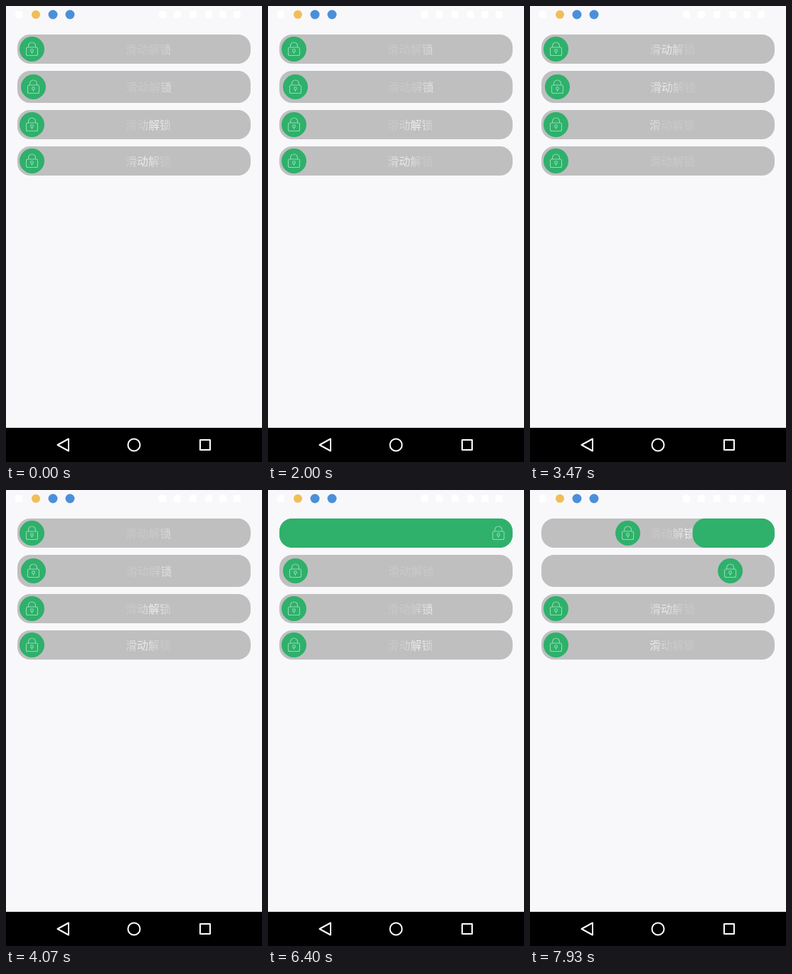
These frames come from a looping animation (360x640 px, 8 s). An HTML page:

```html
<!DOCTYPE html>
<html lang="zh">
<head>
<meta charset="utf-8">
<title>Slide to unlock</title>
<style>
  html, body { margin: 0; width: 100%; height: 100%; overflow: hidden; background: #f8f8fa; }
  svg { display: block; width: 360px; height: 640px; }
  text { font: 16px "Noto Sans CJK SC", "Noto Sans CJK", sans-serif; }
  .nav { fill: none; stroke: #fff; stroke-width: 2; stroke-linejoin: round; }
  .lock { fill: none; stroke: #8fdcb0; stroke-width: 1.1; }
</style>
</head>
<body>
<svg id="stage" viewBox="0 0 360 640">
  <rect width="360" height="640" fill="#f8f8fa"/>
  <g id="status">
    <circle cx="42" cy="12" r="6" fill="#f0be58"/>
    <circle cx="66" cy="12" r="6.5" fill="#4b8fda"/>
    <circle cx="90" cy="12" r="6.5" fill="#4b8fda"/>
  </g>
  <g id="rows"></g>
  <rect y="592" width="360" height="48"/>
  <g class="nav">
    <path d="M72.5 616 88 607.5V624.5Z"/>
    <circle cx="180" cy="616" r="8.5"/>
    <rect x="273" y="609" width="14" height="14"/>
  </g>
</svg>
<script>
const LOOP = 8000;
const LEFT = 16, RIGHT = 344, CORNER = 18, OPEN_X = 324;
const GREEN = '#2fb06b', TRACK = '#bfbfc0';
const TEXT_DIM = '#c9c9ca', TEXT_LIT = '#efeff0';
const SHEEN = { start: 130, period: 2060, speed: 0.08, reach: 27 };

// sheen: x of the bright spot at time zero
const ROWS = [
  { y: 40, h: 41, knobX: 36.5, textX: 168, sheen: 245 },
  { y: 91, h: 45, knobX: 38.5, textX: 169, sheen: 239 },
  { y: 146, h: 41, knobX: 36.5, textX: 168, sheen: 213 },
  { y: 197, h: 41, knobX: 36.5, textX: 168, sheen: 195 }
];

// drags as [time, knob x]
const DRAG_1 = [[4760, 36.5], [4850, 90], [4940, 200], [5035, 271]];
const DRAG_2 = [[7700, 38.5], [7800, 66], [7870, 172], [7930, 281.5], [8000, 290]];
const OPEN_AT = 5035, CLOSE_AT = 7633, SETTLE = 500;

function add(parent, tag, attrs) {
  const node = document.createElementNS('http://www.w3.org/2000/svg', tag);
  set(node, attrs);
  return parent.appendChild(node);
}

function set(node, attrs) {
  for (const key in attrs) node.setAttribute(key, attrs[key]);
}

const mix = (a, b, f) => a + (b - a) * f;

function ease(t, start) {
  const f = Math.min(1, Math.max(0, (t - start) / SETTLE));
  return (1 - Math.cos(Math.PI * f)) / 2;
}

function along(steps, t) {
  if (t <= steps[0][0]) return steps[0][1];
  for (let i = 1; i < steps.length; i++) {
    const [t0, x0] = steps[i - 1], [t1, x1] = steps[i];
    if (t < t1) return mix(x0, x1, (t - t0) / (t1 - t0));
  }
  return steps[steps.length - 1][1];
}

function buildRow(row, i) {
  const g = add(document.getElementById('rows'), 'g', {});
  const bar = { y: row.y, height: row.h, rx: CORNER, ry: CORNER };
  row.mid = row.y + row.h / 2;
  add(g, 'rect', { ...bar, x: LEFT, width: RIGHT - LEFT, fill: TRACK });
  row.gradient = add(g, 'linearGradient', { id: 'sheen' + i, gradientUnits: 'userSpaceOnUse', y1: 0, y2: 0 });
  [TEXT_DIM, TEXT_LIT, TEXT_DIM].forEach((color, n) =>
    add(row.gradient, 'stop', { offset: n / 2, 'stop-color': color }));
  row.label = add(g, 'text', { x: row.textX, y: row.mid + 6, fill: `url(#sheen${i})` });
  row.label.textContent = '滑动解锁';
  row.fill = add(g, 'rect', { ...bar, fill: GREEN });
  row.knob = add(g, 'g', {});
  add(row.knob, 'circle', { r: 17.5, fill: GREEN });
  const lock = add(row.knob, 'g', { class: 'lock' });
  add(lock, 'rect', { x: -8, y: -2.5, width: 16, height: 11.5, rx: 2 });
  add(lock, 'path', { d: 'M-5-2.5V-4.5A5 5 0 0 1 5-4.5V-2.5M0 4V6.5' });
  add(lock, 'circle', { cy: 2.2, r: 1.9 });
}

function pose(i, t) {
  if (i === 0) {
    if (t >= CLOSE_AT) {
      const f = ease(t, CLOSE_AT);
      return { x: mix(OPEN_X, ROWS[0].knobX, f), open: 1 - f, label: true };
    }
    const open = ease(t, OPEN_AT);
    return { x: mix(along(DRAG_1, t), OPEN_X, open), open, label: t < DRAG_1[0][0] };
  }
  if (i === 1) return { x: along(DRAG_2, t), open: 0, label: t < DRAG_2[0][0] };
  return { x: ROWS[i].knobX, open: 0, label: true };
}

function drawRow(row, i, t) {
  const { x, open, label } = pose(i, t);
  const width = (RIGHT - LEFT) * open;
  const span = SHEEN.period * SHEEN.speed;
  const spot = SHEEN.start + (row.sheen - SHEEN.start + t * SHEEN.speed) % span;
  set(row.gradient, { x1: spot - SHEEN.reach, x2: spot + SHEEN.reach });
  set(row.label, { visibility: label ? 'visible' : 'hidden' });
  set(row.fill, { x: RIGHT - width, width });
  set(row.knob, { transform: `translate(${x} ${row.mid})` });
}

const status = document.getElementById('status');
for (const x of [18, 220, 241, 263, 285, 305, 325])
  add(status, 'rect', { x: x - 5, y: 7, width: 10, height: 10, rx: 3, fill: '#fff' });
ROWS.forEach(buildRow);

const began = performance.now();
function tick() {
  const t = (performance.now() - began) % LOOP;
  ROWS.forEach((row, i) => drawRow(row, i, t));
  requestAnimationFrame(tick);
}
tick();
</script>
</body>
</html>
```
